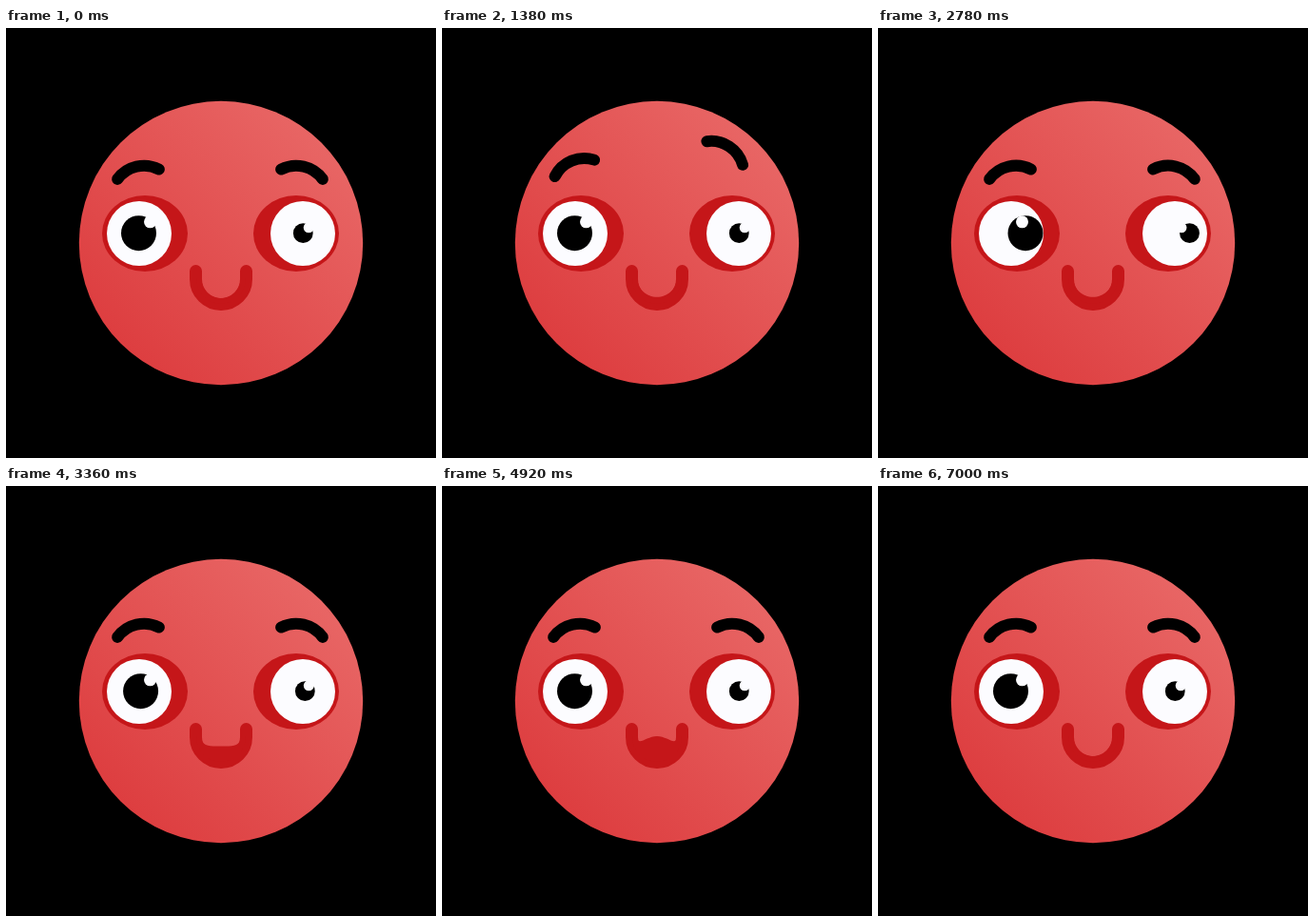
An HTML page with a canvas for the animation above (7020 ms loop, 452 px wide and 452 px high).

```html
<!DOCTYPE html>
<html lang="en">
<head>
<meta charset="utf-8">
<title>Wobbly face</title>
<style>
  html, body { margin: 0; width: 100%; height: 100%; overflow: hidden; background: #000; }
  canvas { display: block; width: 452px; height: 452px; }
</style>
</head>
<body>
<canvas id="stage" width="452" height="452"></canvas>
<script>
const ctx = document.getElementById('stage').getContext('2d');
const LOOP = 7020;
const DARK = '#c51619';
const WHITE = '#fcfcff';

const skin = ctx.createLinearGradient(115, 335, 335, 115);
skin.addColorStop(0, '#dd3d3f');
skin.addColorStop(1, '#e86665');

// Cubic Bezier easing with flat ends: (x1, 0, x2, 1)
function bezier(x1, x2) {
  return u => {
    if (u <= 0) return 0;
    if (u >= 1) return 1;
    let lo = 0, hi = 1;
    for (let i = 0; i < 24; i++) {
      const s = (lo + hi) / 2, r = 1 - s;
      const x = 3 * r * r * s * x1 + 3 * r * s * s * x2 + s * s * s;
      if (x < u) lo = s; else hi = s;
    }
    return lo * lo * (3 - 2 * lo);
  };
}
const snap = bezier(1, 0.8);
const glide = bezier(0.8, 0.6);

// Three uneven ticks per 140 ms: 20, 100 and 20 ms long
function tickAt(ms) {
  const rest = ms % 140;
  return 3 * Math.floor(ms / 140) + (rest < 20 ? 0 : rest < 120 ? 1 : 2);
}

const ramp = (n, from, to, ease) => ease((n - from) / (to - from));

function pose(n) {
  const beat = n % 30;
  return {
    brow: ramp(n, 0, 30, glide) - ramp(n, 30, 60, glide),
    look: ramp(n, 30, 45, glide) - ramp(n, 60, 75, glide),
    mouth: ramp(beat, 0, 15, snap) - ramp(beat, 15, 30, snap)
  };
}

function oval(x, y, rx, ry, fill) {
  ctx.beginPath();
  ctx.ellipse(x, y, rx, ry, 0, 0, Math.PI * 2);
  ctx.fillStyle = fill;
  ctx.fill();
}
const disc = (x, y, r, fill) => oval(x, y, r, r, fill);

function brow(x, y, side, turn, dx, dy) {
  ctx.save();
  ctx.translate(x + dx, y + dy);
  ctx.rotate(turn * Math.PI / 180);
  ctx.scale(side, 1);
  ctx.beginPath();
  // Arc centre relative to the middle of the brow
  ctx.arc(-5.5, 24.7, 34.5, -2.05, -0.63);
  ctx.lineWidth = 12;
  ctx.lineCap = 'round';
  ctx.strokeStyle = '#000';
  ctx.stroke();
  ctx.restore();
}

function eye(cx, whiteX, r, pupilX, pupilR, glintX, glintY, glintR) {
  oval(cx, 216, 45, 40, DARK);
  disc(whiteX, 216, r, WHITE);
  disc(pupilX, 215.7, pupilR, '#000');
  disc(glintX, glintY, glintR, WHITE);
}

function mouth(open) {
  const lip = 284 - 21 * open;
  ctx.beginPath();
  ctx.moveTo(199.5, 255.5);
  ctx.lineTo(199.5, 264);
  ctx.arc(226, 264, 26.5, Math.PI, 0, true);
  ctx.lineTo(252.5, 255.5);
  ctx.lineWidth = 13;
  ctx.lineCap = 'round';
  ctx.strokeStyle = DARK;
  ctx.stroke();

  ctx.beginPath();
  ctx.moveTo(205.5, 263.5);
  ctx.bezierCurveTo(205.5, 274.5, 215, lip, 226, lip);
  ctx.bezierCurveTo(237, lip, 246.5, 274.5, 246.5, 263.5);
  ctx.lineTo(252, 264);
  ctx.arc(226, 264, 26, 0, Math.PI);
  ctx.closePath();
  ctx.fillStyle = DARK;
  ctx.fill();
}

function draw(ms) {
  const p = pose(tickAt(ms));
  ctx.fillStyle = '#000';
  ctx.fillRect(0, 0, 452, 452);
  disc(226, 226, 149.2, skin);
  brow(139.5, 154.5, -1, -9.5 * p.brow, 0.5 * p.brow, -6.5 * p.brow);
  brow(310.5, 154.5, 1, 20 * p.brow, -14 * p.brow, -22.5 * p.brow);
  eye(146, 140, 34, 139.5 + 15.5 * p.look, 18.5, 151.5, 203.8, 6.5);
  eye(305, 312, 34, 312.3 + 15.2 * p.look, 10.4, 318.2 + 0.8 * p.look, 209.8, 5.5);
  mouth(p.mouth);
}

const start = performance.now();
function loop() {
  draw((performance.now() - start) % LOOP);
  requestAnimationFrame(loop);
}
loop();
</script>
</body>
</html>
```
